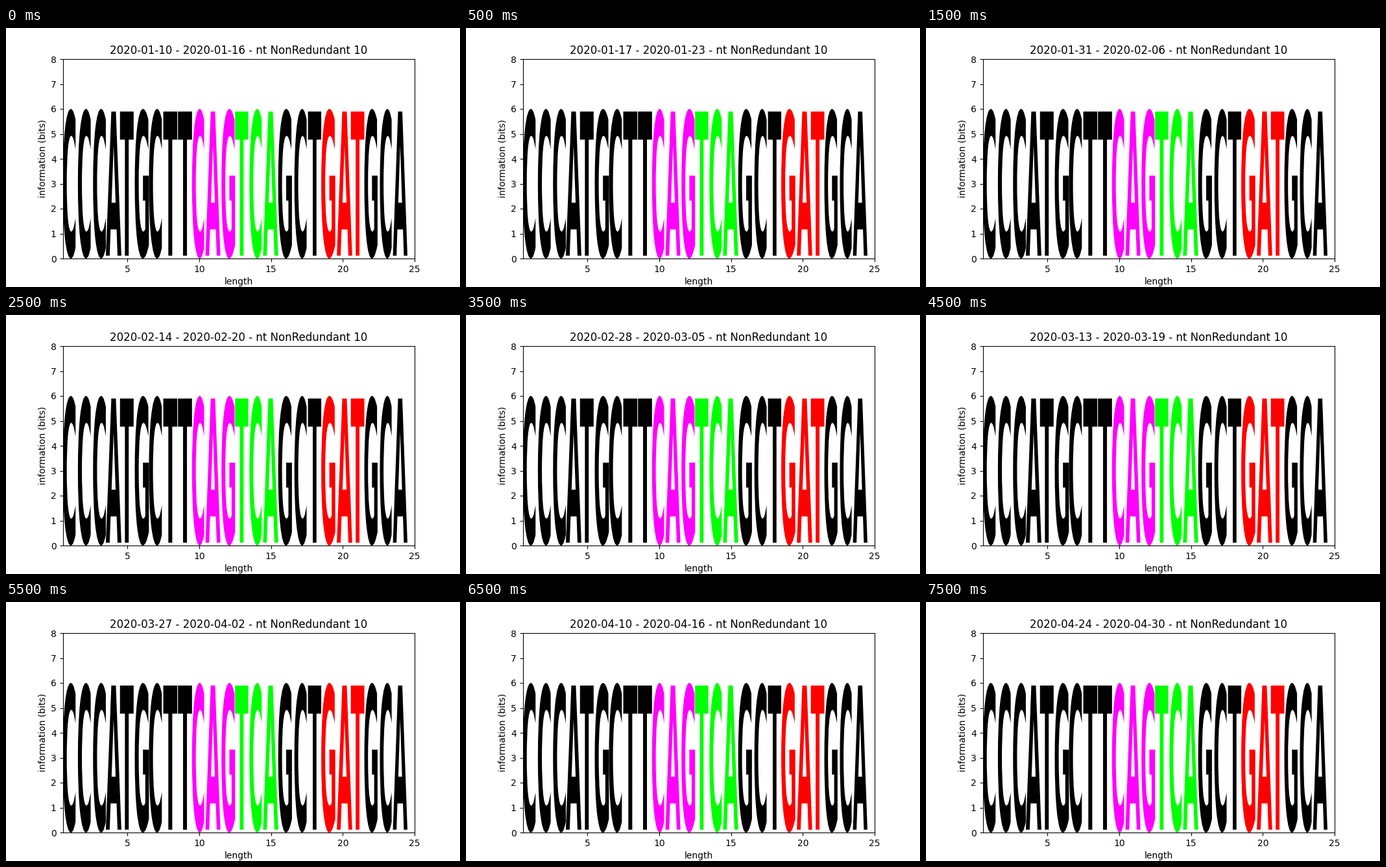
A matplotlib script that plays this animation: 700 by 400 pixels, repeating every 8000 ms.

```python
import numpy as np
import matplotlib.pyplot as plt
from matplotlib.animation import FuncAnimation
from matplotlib.patches import PathPatch
from matplotlib.textpath import TextPath
from matplotlib.transforms import Affine2D

FRAMES, INTERVAL = 16, 500
START = np.datetime64("2020-01-10")
CODONS = ["CCC", "ATG", "CTT", "CAG", "TCA", "GCT", "GAT", "GCA"]
COLORS = {"CAG": "#ff00ff", "TCA": "#00ff00", "GAT": "#ff0000"}
BITS = 6

fig, ax = plt.subplots(figsize=(7, 4), dpi=100)


def add_codon(codon, x, width, height):
    """Stretch the codon's outline to fill a box standing on the x axis."""
    path = TextPath((0, 0), codon, size=1,
                    prop={"family": "DejaVu Sans", "weight": "bold"})
    box = path.get_extents()
    fit = (Affine2D().translate(-box.x0, -box.y0)
           .scale(width / box.width, height / box.height)
           .translate(x, 0))
    ax.add_patch(PathPatch(fit.transform_path(path), lw=0,
                           fc=COLORS.get(codon, "black")))


for i, codon in enumerate(CODONS):
    add_codon(codon, 0.5 + 3 * i, 3, BITS)

ax.set(xlim=(0.5, 25), ylim=(0, 8), xticks=range(5, 26, 5), yticks=range(9),
       xlabel="length", ylabel="information (bits)")
title = ax.set_title("")


def update(week):
    first = START + 7 * week
    title.set_text(f"{first} - {first + 6} - nt NonRedundant 10")
    return [title]


anim = FuncAnimation(fig, update, frames=FRAMES, interval=INTERVAL,
                     repeat=True, repeat_delay=0)
plt.show()
```
